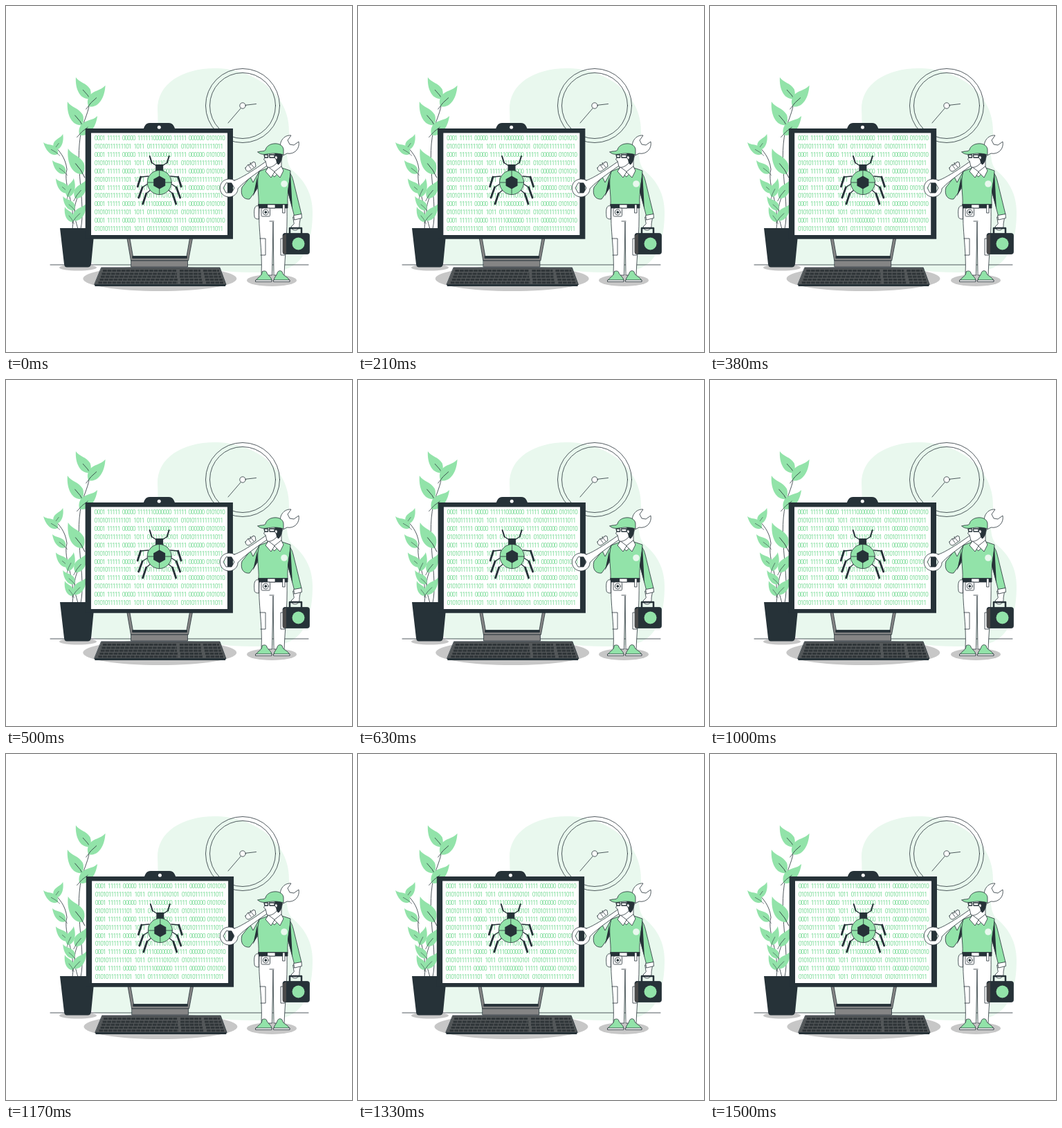
These frames come from a looping animation (500 px wide and 500 px high, 1540 ms). An HTML page without scripts:

```html
<!DOCTYPE html>
<html lang="en">
<head>
<meta charset="utf-8">
<title>Bug repair</title>
<style>
html, body { margin: 0; width: 100%; height: 100%; overflow: hidden; background: #fff; }
svg { display: block; width: 100vw; height: 100vh; }
.dark { fill: #263238; }
.green { fill: #92e3a9; }
.pale { fill: #e9f8ee; }
.white { fill: #fff; }
.shadow { fill: #c7c7c7; }
.none { fill: none; }
.line { stroke: #263238; stroke-width: .8; stroke-linejoin: round; stroke-linecap: round; }
.vein { stroke-width: .55; }
.code { font: 400 8.6px Roboto, sans-serif; letter-spacing: -1.06px; fill: #7cdc99; }
.row-a { word-spacing: 2px; }
.row-b { word-spacing: 2.9px; }
.computer { animation: shake 1540ms cubic-bezier(.5, 0, .1, 1) infinite; }
@keyframes shake {
  0%, 97.4%, 100% { transform: translateX(0); }
  9.74%, 29.22%, 48.7%, 68.18% { transform: translateX(-1.15px); }
  19.48%, 38.96%, 58.44%, 77.92% { transform: translateX(1.15px); }
  87.66% { transform: translateX(-.9px); }
}
</style>
</head>
<body>
<svg viewBox="0 0 500 500">
  <defs>
    <g id="leaf">
      <path class="green" d="M0 0C-9-4-9.500-17 0-30C0-22 7-18 6.500-9Q5-3 0 0Z"/>
      <path class="none line vein" d="M0 4Q1-5-1-13"/>
    </g>
    <g id="rows" class="code">
      <text class="row-a" x="127.700" y="194.300">0001 11111 00000 1111110000000 11111 000000 0101010</text>
      <text class="row-b" x="127.700" y="206.200">01010111111101 1011 011111010101 0101011111111011</text>
    </g>
    <g id="legs" class="none" stroke="#263238" stroke-linejoin="round" stroke-linecap="round">
      <path stroke-width="1.300" d="M-4-24L-11-28.500M-16-9L-27-8M-17 2L-24.500 7M-13 11L-19 16"/>
      <path stroke-width="2" d="M-11-28.500L-14-38"/>
      <path stroke-width="2.800" d="M-27-8L-31.500 6M-24.500 7L-30 22M-19 16L-24 31"/>
    </g>
  </defs>

  <path class="pale" d="M219 150C218 112 256 89 305 90C365 92 412 132 409 185C406 205 403 224 413 237C432 252 443 272 443 298C443 340 432 371 405 380C360 391 300 381 260 378C220 376 165 378 130 374C105 365 105 330 160 300C210 270 222 210 219 150Z"/>
  <path class="line" d="M64 374H437"/>

  <g class="none line">
    <circle cx="342" cy="144" r="53.500"/>
    <circle cx="342" cy="144" r="47.500"/>
    <path d="M346 143.300L361.500 141.500M339.500 147.500L321 169"/>
    <circle class="white" cx="342" cy="144" r="4.200"/>
  </g>

  <g id="plant">
    <ellipse class="shadow" cx="104" cy="378" rx="27" ry="4.500"/>
    <g class="none line">
      <path d="M108 322C116 285 98 230 109 180C114 160 123 148 121 127"/>
      <path d="M96 322C101 285 82 260 88 236C86 218 76 209 70 202"/>
      <path d="M104 322C97 300 97 290 106 270"/>
    </g>
    <use href="#leaf" transform="translate(121 134)rotate(-33)scale(1.23)"/>
    <use href="#leaf" transform="translate(119 145)rotate(39)scale(-1.3 1.3)"/>
    <use href="#leaf" transform="translate(110 172)rotate(-32)scale(1.33)"/>
    <use href="#leaf" transform="translate(106 186)rotate(44)scale(-1.25 1.25)"/>
    <use href="#leaf" transform="translate(111 243)rotate(-30)scale(1.42)"/>
    <use href="#leaf" transform="translate(70 208)rotate(28)scale(-.87 .87)"/>
    <use href="#leaf" transform="translate(75 214)rotate(-51)scale(.9)"/>
    <use href="#leaf" transform="translate(86 242)rotate(-45)scale(.9)"/>
    <use href="#leaf" transform="translate(90 270)rotate(-41)scale(.92)"/>
    <use href="#leaf" transform="translate(89 276)rotate(18)scale(-.95 .95)"/>
    <use href="#leaf" transform="translate(99 295)rotate(-40)scale(.87)"/>
    <use href="#leaf" transform="translate(100 278)rotate(31)scale(-1.1 1.1)"/>
    <use href="#leaf" transform="translate(97 312)rotate(-29)scale(.83)"/>
    <use href="#leaf" transform="translate(98 310)rotate(36)scale(-1.03 1.03)"/>
    <path class="dark" d="M78 321H128L123 373Q122 377.500 118 377.500H88Q84.500 377.500 84 373Z"/>
  </g>

  <g class="computer">
    <ellipse class="shadow" cx="222.300" cy="394" rx="111" ry="18"/>
    <g class="line">
      <path fill="#858585" d="M175 336L180.500 368H263.500L269.500 336H265.500L261 362H183.500L179 336Z"/>
      <path class="dark" d="M183 361.500H261.500V364.500H183Z"/>
      <rect fill="#858585" x="181" y="368" width="81.500" height="9"/>
    </g>
    <path class="dark" d="M198 179C200 175 201 169 208 169H235C242 169 243 175 245 179Z"/>
    <path class="dark" d="M114.700 177H328V336.700H114.700Z"/>
    <circle class="white" cx="221.300" cy="175.200" r="2.500"/>
    <path class="white" d="M123 183.500H320V331H123Z"/>
    <use href="#rows"/>
    <use href="#rows" y="23.750"/>
    <use href="#rows" y="47.500"/>
    <use href="#rows" y="71.250"/>
    <use href="#rows" y="95"/>
    <use href="#rows" y="118.750"/>

    <g transform="translate(221.700 255)">
      <use href="#legs"/>
      <use href="#legs" transform="scale(-1 1)"/>
      <path class="dark" d="M-5.500-26H5.500V-15H-5.500Z"/>
      <circle class="green line" r="17.500"/>
      <path class="line" d="M0-17V17M-17 0H17"/>
      <path class="dark" d="M0-9.500L8.500-4.800V4.800L0 9.500L-8.500 4.800V-4.800Z"/>
    </g>

    <path class="dark" d="M128 402H318L317 405H128.500Z"/>
    <path class="line" fill="#535759" d="M138 378H309L318 402.500H128Z"/>
    <g class="none" stroke="#2f3538" stroke-width="3" stroke-dasharray="5.700 1">
      <path d="M140 382.500H246M251 382.500H281M285 382.500H308"/>
      <path d="M138.500 387H247M251 387H282M286 387H310"/>
      <path d="M137 391.300H247M251 391.300H282M287 391.300H311"/>
      <path d="M135.500 395.600H248M252 395.600H283M288 395.600H313"/>
      <path d="M133.500 399.700H248M252 399.700H284M289 399.700H314"/>
    </g>
  </g>

  <g id="mechanic" class="line">
    <ellipse class="shadow" cx="384" cy="396.500" rx="36" ry="8.500" stroke="none"/>
    <path class="white" d="M366 290H406C407 330 403 360 402 389H387L386 312L384.500 389H369C371 350 364 325 366 290Z"/>
    <path class="none" d="M367 336H375V360H368M405 336H397V360H403M381 311H387"/>
    <path class="green" d="M361 397C365 390 370 391 370 384C373 382 377 383 377 386C379 390 384 392 384 397ZM387 397C387 392 391 390 392 386C393 382 397 382 399 384C400 391 407 390 410 397Z"/>
    <path class="white" d="M361 396H384V398.500H361ZM387 396H410V398.500H387Z"/>

    <path class="white" d="M415 305L426 303L424 315C425 322 420 326 414 323L412 319L416 315Z"/>
    <path class="none" d="M410 330V321H427V330" style="stroke-width:2.500"/>
    <rect class="dark" x="400" y="328.500" width="38.500" height="30" rx="3"/>
    <path fill="#4b4b4b" stroke="none" d="M400 332L405 329V358H400Z"/>
    <circle class="green" cx="422.500" cy="343.500" r="9" stroke="none"/>

    <path class="green" d="M366 239L357 255L353 247L341 262C338 274 344 280 352 279L366 260Z"/>
    <path class="green" d="M402 237C411 239 413 245 415 252L427 301L416.500 303L406 262Z"/>
    <path class="white" d="M416 302.500L427 300.500L427.500 306.500L417 309Z"/>
    <path class="green" d="M366 239L379 234H399L411 238C411 252 406 265 407 288H365C366 270 361 256 366 239Z"/>
    <path class="dark" stroke="none" d="M363 247L357 275L364 261ZM411 240L414 294L407 268Z"/>
    <circle class="pale" cx="402" cy="257" r="4.800" stroke="none"/>

    <path class="white" fill-rule="evenodd" d="M330 252C342 249 386 219 397 207C394 197 401 186 412 187L407 194L410 200L416 201L423 196C425 206 417 215 406 213C392 220 346 251 335 264C335 271 329 276 322 276C305 275 305 251 322 250Q327 250 330 252ZM318 256L314 263L318 270H326L330 263L326 256Z"/>

    <path class="white" d="M378 225V238L388 247L398 236V222Z"/>
    <path class="white" d="M379 233L375 239L383 248L388 240ZM398 232L401 238L396 248L388 240Z"/>
    <path class="white" d="M375 212V217L372.500 222L375 224L377 232C380 235 387 232 392 226L397 214Z"/>
    <path class="dark" d="M389 213H399C400 220 397 226 394 229C390 228 392 223 389 219Z"/>
    <path class="white" d="M388 218C391 215 394 218 391 222Z"/>
    <path class="white" style="stroke-width:1.300" d="M373 215H378.500V219H374ZM380.500 215H388V219H381Z"/>
    <path class="green" d="M364 211C368 209 373 211 375 208C377 197 399 195 401 207V215C392 212 384 213 377 214C372 215 366 214 364 211Z"/>

    <path class="dark" d="M365 286.500H407V292H365Z"/>
    <path class="white" d="M378 287H389V292H378ZM400 287H403V299H400Z"/>
    <path class="white" d="M365 289C359 287 358 294 359 304Q359 308 365 308Z"/>
    <rect class="white" x="369" y="292" width="12.500" height="12" rx="1.500"/>
    <circle class="white" cx="375.300" cy="298" r="4"/>
    <circle class="dark" cx="375.300" cy="298" r="1.500"/>

    <path class="white" d="M346 234L350 229L353 230L353 227L356 227L357 225L360 226L361 232L351 239Q346 239 346 234Z"/>
    <path class="none" d="M350 230L354 235M353 227L358 233"/>
  </g>
</svg>
</body>
</html>
```
